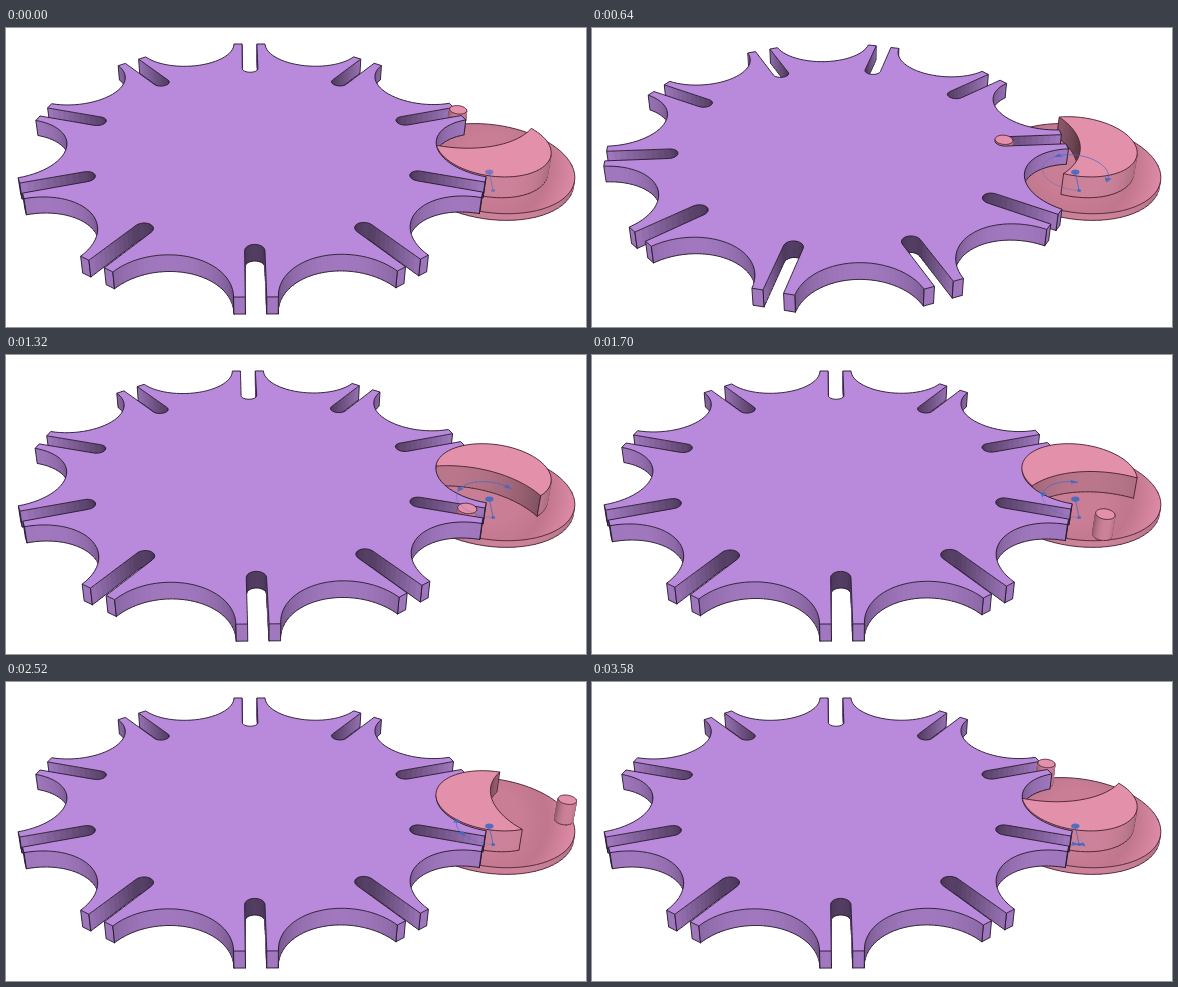
An HTML page with a canvas that plays this animation: 580x299 px, repeating every 3600 ms.

```html
<!DOCTYPE html>
<html lang="en">
<head>
<meta charset="utf-8">
<title>Geneva drive</title>
<style>
html, body { margin: 0; width: 100%; height: 100%; overflow: hidden; background: #fff; }
canvas { display: block; width: 580px; height: 299px; }
</style>
</head>
<body>
<canvas id="stage"></canvas>
<script>
const LOOP = 3600, MID = 726, RAD = Math.PI / 180;
const SLOTS = 10, STEP = 36 * RAD;
const CRANK = Math.sin(STEP / 2);
const RIM = 0.951, SLOT = 0.0365, TIP = 0.076;
const LOCK = 0.235, PIN = 0.037, BASE = 0.345;
const TOP = 0.008, WHEEL_LOW = -0.0757, BASE_TOP = -0.092, BASE_LOW = -0.124;
const PURPLE = [185, 138, 219], PINK = [227, 145, 171];
const INK = '#24182c', PINK_INK = '#47202c';

const cv = document.getElementById('stage');
const ctx = cv.getContext('2d');
const dpr = window.devicePixelRatio || 1;
cv.width = 580 * dpr;
cv.height = 299 * dpr;
ctx.scale(dpr, dpr);
ctx.lineJoin = 'round';

const clamp = (v, a, b) => Math.min(b, Math.max(a, v));
const tone = (c, f) => `rgb(${c.map(v => Math.round(v * f)).join()})`;
const polar = (r, a) => [r * Math.cos(a), r * Math.sin(a)];

// Perspective view: x right, y away, z up; one unit is the axle distance
function project([x, y], z) {
  const w = 1 + 0.0033 * x + 0.191 * y - 0.1274 * z;
  return [(242.3 * x + 43.7 * y + 246.15 - 33 * z) / w,
          (119.5 - 105.8 * y - 220.7 * z) / w];
}

function rotate([x, y], a) {
  const c = Math.cos(a), s = Math.sin(a);
  return [x * c - y * s, x * s + y * c];
}

function arc(cx, cy, r, from, to, n) {
  return Array.from({ length: n + 1 }, (_, i) => {
    const p = polar(r, from + (to - from) * i / n);
    return [cx + p[0], cy + p[1]];
  });
}

function line(a, b, n) {
  return Array.from({ length: n + 1 }, (_, i) =>
    [a[0] + (b[0] - a[0]) * i / n, a[1] + (b[1] - a[1]) * i / n]);
}

function trace(pts) {
  ctx.beginPath();
  pts.forEach(p => ctx.lineTo(p[0], p[1]));
}

function stroke(pts, color, width, cap = 'round') {
  trace(pts);
  ctx.strokeStyle = color;
  ctx.lineWidth = width;
  ctx.lineCap = cap;
  ctx.stroke();
}

// Outline of one slot, its two tips and the locking arc that follows
const sector = (() => {
  const end = 1 - CRANK + 0.004, q = Math.PI / 2;
  const slot = [
    ...line([RIM, -SLOT], [end, -SLOT], 10),
    ...arc(end, 0, SLOT, -q, -3 * q, 12).slice(1),
    ...line([end, SLOT], [RIM, SLOT], 10).slice(1)
  ];
  const from = rotate([RIM, TIP], -STEP / 2);
  const a = Math.atan2(from[1], from[0] - 1);
  const r = Math.hypot(from[0] - 1, from[1]);
  const dip = arc(1, 0, r, a + 2 * Math.PI, -a, 28).map(p => rotate(p, STEP / 2));
  return [
    { kind: 'tip', pts: [[RIM, -TIP], [RIM, -SLOT]] },
    { kind: 'slot', pts: slot },
    { kind: 'tip', pts: [[RIM, SLOT], [RIM, TIP]] },
    { kind: 'arc', pts: dip }
  ];
})();

// Locking hub: a disc with a round bite facing the pin
const hub = (() => {
  const half = 72 * RAD, sag = 0.077;
  const chord = LOCK * Math.sin(half), off = LOCK * Math.cos(half);
  const r = (chord * chord + sag * sag) / (2 * sag);
  const c = off - sag + r;
  const a = Math.atan2(chord, off - c);
  return [
    { kind: 'round', pts: arc(0, 0, LOCK, half, 2 * Math.PI - half, 48) },
    { kind: 'bite', pts: arc(c, 0, r, 2 * Math.PI - a, a, 30) }
  ];
})();

const disc = r => [{ kind: 'round', pts: arc(0, 0, r, 0, 2 * Math.PI, 72) }];

const place = (pieces, a, dx = 0, dy = 0) => pieces.map(({ kind, pts }) => ({
  kind,
  pts: pts.map(p => {
    const q = rotate(p, a);
    return [q[0] + dx, q[1] + dy];
  })
}));

function shade(kind, p, q) {
  const dx = q[0] - p[0], dy = q[1] - p[1];
  const front = Math.max(0, dx / Math.hypot(dx, dy));
  if (kind === 'slot') {
    const r = Math.hypot((p[0] + q[0]) / 2, (p[1] + q[1]) / 2);
    return 0.33 + 0.42 * clamp((r - 0.66) / 0.29, 0, 1) + 0.12 * front;
  }
  if (kind === 'tip') return 0.8 + 0.07 * front;
  if (kind === 'arc') return 0.58 + 0.29 * front;
  if (kind === 'bite') return 0.42 + 0.4 * front;
  return 0.62 + 0.28 * front;
}

// Camera-facing side faces of a prism
function walls(pieces, high, low, color, ink) {
  const out = [];
  for (const { kind, pts } of pieces) {
    let last = null;
    for (let i = 1; i < pts.length; i++) {
      const p = pts[i - 1], q = pts[i];
      const a = project(p, high), b = project(q, high);
      const c = project(q, low), d = project(p, low);
      const area = (b[0] - a[0]) * (d[1] - a[1]) - (b[1] - a[1]) * (d[0] - a[0]);
      if (area <= 0) { last = null; continue; }
      const face = { a, b, c, d, ink, y: (p[1] + q[1]) / 2,
        fill: tone(color, shade(kind, p, q)), left: !last, right: true };
      if (last) last.right = false;
      out.push(last = face);
    }
  }
  return out;
}

function drawWalls(faces) {
  faces.sort((m, n) => n.y - m.y);
  for (const { a, b, c, d, ink, fill, left, right } of faces) {
    trace([a, b, c, d]);
    ctx.closePath();
    ctx.fillStyle = fill;
    ctx.fill();
    // Ink the outer edges, seal the inner seams
    stroke([a, d], left ? ink : fill, left ? 0.9 : 1.2, 'butt');
    stroke([b, c], right ? ink : fill, right ? 0.9 : 1.2, 'butt');
    stroke([d, c], ink, 0.9);
  }
}

function drawTop(pieces, z, fill, ink) {
  const pts = pieces.flatMap(p => p.pts).map(p => project(p, z));
  trace(pts);
  ctx.closePath();
  ctx.fillStyle = fill;
  ctx.fill();
  stroke([...pts, pts[0]], ink, 0.9);
}

function dot(p, rx, ry) {
  ctx.beginPath();
  ctx.ellipse(p[0], p[1], rx, ry, 0, 0, 7);
  ctx.fill();
}

// Rotation handle on the crank axle
function drawHandle(t) {
  const blue = '#4468c4', r = 0.137, ref = -95 * RAD;
  const at = (rad, a) => {
    const p = polar(rad, a);
    return project([1 + p[0], p[1]], BASE_LOW);
  };
  const ring = (from, to, width) =>
    stroke(arc(1, 0, r, from, to, 40).map(p => project(p, BASE_LOW)), blue, width);
  const axle = at(0, 0);
  ctx.globalAlpha = t < 20 ? 0.6 : 0.9;
  ctx.fillStyle = blue;
  stroke([axle, at(r, ref)], blue, 0.9);
  dot(axle, 4.2, 2.7);
  dot(at(r, ref), 2, 1.5);
  if (t >= 20) {
    const from = ref + 0.1 * t * RAD;
    const to = ref + (180 + 0.05 * t) * RAD;
    ring(from, to, 0.8);
    ring(to, ref + 2 * Math.PI, 0.4);
    for (const [a, s] of [[from, -1], [to, 1]]) {
      const back = a - s * 0.2;
      trace([at(r, a + s * 0.05), at(r * 1.11, back), at(r * 0.89, back)]);
      ctx.fill();
    }
  }
  ctx.globalAlpha = 1;
}

// Base plate, darker towards the axle
function drawBase() {
  const plate = place(disc(BASE), 0, 1);
  drawWalls(walls(plate, BASE_TOP, BASE_LOW, PINK, PINK_INK));
  const [x, y] = project([1, 0], BASE_TOP);
  const g = ctx.createRadialGradient(x, y, 30, x, y, 84);
  g.addColorStop(0, '#c97e95');
  g.addColorStop(0.5, '#c0768d');
  g.addColorStop(1, '#dc8aa5');
  drawTop(plate, BASE_TOP, g, PINK_INK);
}

function draw(t) {
  const crank = 0.1 * (t - MID) * RAD;
  const held = clamp(crank, -72 * RAD, 72 * RAD);
  const turn = Math.atan2(-CRANK * Math.sin(held), 1 - CRANK * Math.cos(held));
  const aim = Math.PI + crank;
  const [px, py] = polar(CRANK, aim);

  const wheel = [];
  for (let k = 0; k < SLOTS; k++) wheel.push(...place(sector, turn + k * STEP));
  const lock = place(hub, aim, 1);
  const pin = place(disc(PIN), 0, 1 + px, py);

  ctx.fillStyle = '#fff';
  ctx.fillRect(0, 0, 580, 299);
  drawBase();
  drawWalls([
    ...walls(wheel, 0, WHEEL_LOW, PURPLE, INK),
    ...walls(lock, TOP, BASE_TOP, PINK, PINK_INK),
    ...walls(pin, TOP, BASE_TOP, PINK, PINK_INK)
  ]);
  drawTop(wheel, 0, tone(PURPLE, 1), INK);
  drawTop(lock, TOP, tone(PINK, 1), PINK_INK);
  drawTop(pin, TOP, tone(PINK, 1), PINK_INK);
  drawHandle(t);
}

const start = performance.now();
function tick() {
  draw((performance.now() - start) % LOOP);
  requestAnimationFrame(tick);
}
draw(0);
requestAnimationFrame(tick);
</script>
</body>
</html>
```
